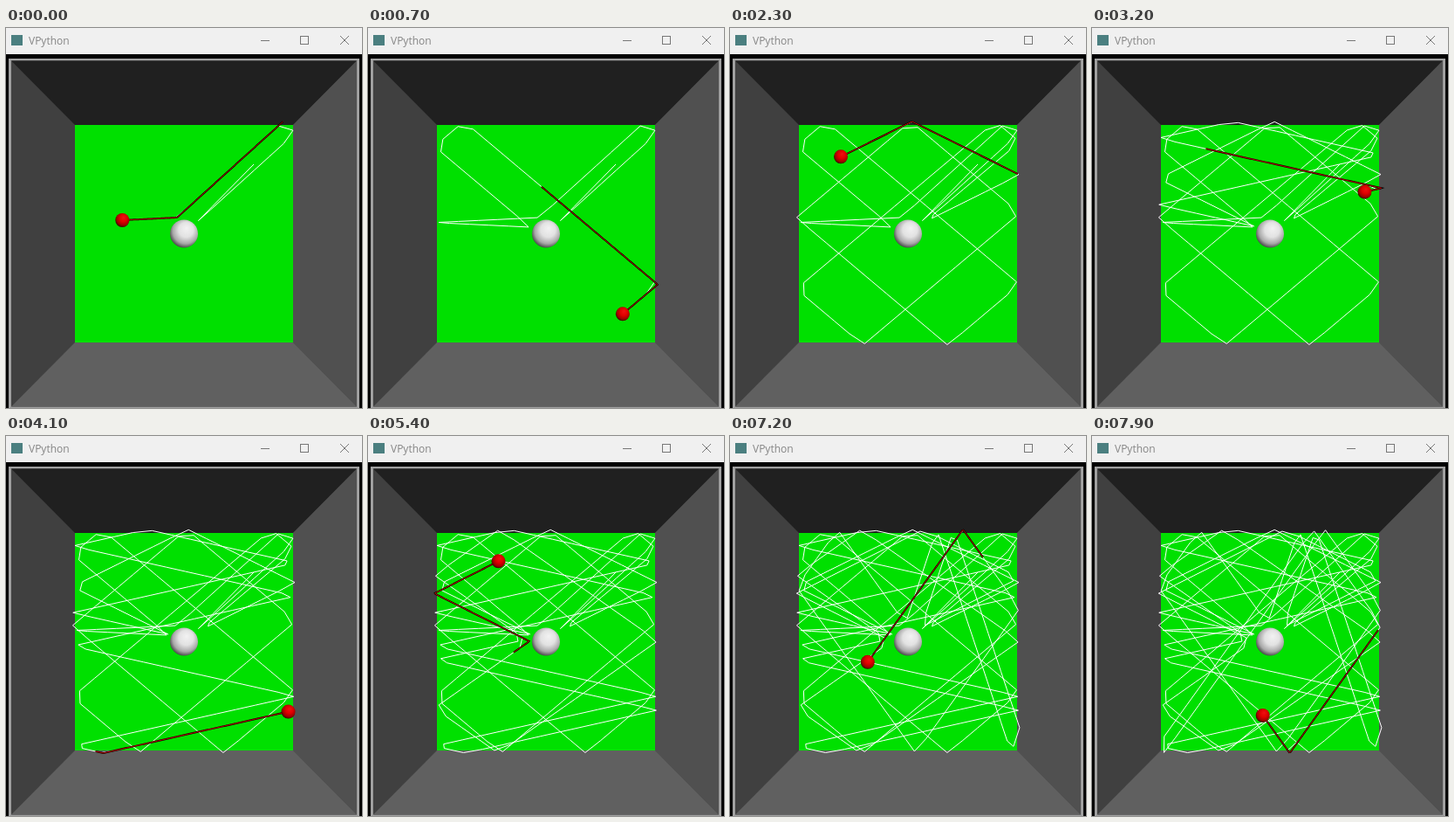
Animation of 408 by 435 pixels, one loop 8 s. Source, as an HTML page with a canvas:

```html
<!DOCTYPE html>
<html lang="en">
<head>
<meta charset="utf-8">
<title>VPython</title>
<style>
html, body { margin: 0; width: 100%; height: 100%; overflow: hidden; background: #000; }
canvas { position: absolute; left: 0; top: 0; }
span { position: absolute; left: 26px; top: 6px; font: 12px/18px "Open Sans", "Noto Sans", sans-serif; color: #858585; }
</style>
</head>
<body>
<canvas id="stage" width="408" height="435"></canvas>
<span>VPython</span>
<script>
const ctx = document.getElementById('stage').getContext('2d');
const LOOP = 8000, TICK = 100;
const SIZE = 256, LEFT = 76, TOP = 107;   // square in which the ball's centre moves
const STEP = 22.64;                       // distance between points of the white trail
const START = [284, 156];

// Straight runs between hits on the central sphere; wall bounces come from folding.
const RUNS = [[-65, 66], [249, -225], [-230, 11], [-1499, -1260], [475, -235],
  [-2263, -506], [-726, -510], [-478, -240], [244, -732], [-1030, -1432]];

// [time in ms, distance travelled]
const PACE = [[0, 491], [1400, 1887], [1800, 2262], [2300, 2967], [3600, 4555],
  [4100, 5087], [4500, 5539], [5400, 6557], [6500, 7798], [7900, 9422]];

function fold(v, low) {
  const m = (((v - low) % (2 * SIZE)) + 2 * SIZE) % (2 * SIZE);
  return low + Math.min(m, 2 * SIZE - m);
}

let from = START, total = 0;
const legs = RUNS.map(([dx, dy]) => {
  const leg = { x: from[0], y: from[1], dx, dy, begin: total, len: Math.hypot(dx, dy) };
  total += leg.len;
  from = [fold(leg.x + dx, LEFT), fold(leg.y + dy, TOP)];
  return leg;
});

function at(d) {
  const leg = legs.find(l => d < l.begin + l.len) || legs[legs.length - 1];
  const k = (d - leg.begin) / leg.len;
  return [fold(leg.x + leg.dx * k, LEFT), fold(leg.y + leg.dy * k, TOP)];
}

function distance(t) {
  const i = Math.max(1, PACE.findIndex(p => p[0] >= t));
  const [t0, d0] = PACE[i - 1], [t1, d1] = PACE[i];
  return d0 + (d1 - d0) * (t - t0) / (t1 - t0);
}

function poly(color, ...pts) {
  ctx.fillStyle = color;
  ctx.beginPath();
  pts.forEach(p => ctx.lineTo(...p));
  ctx.fill();
}

function line(color, width, pts) {
  ctx.strokeStyle = color;
  ctx.lineWidth = width;
  ctx.beginPath();
  pts.forEach(p => ctx.lineTo(...p));
  ctx.stroke();
}

function box(color, x, y, w, h) {
  ctx.fillStyle = color;
  ctx.fillRect(x, y, w, h);
}

function sphere(x, y, r, colors) {
  const g = ctx.createRadialGradient(x + r * 0.2, y - r * 0.4, 0, x + r * 0.1, y - r * 0.15, r * 1.18);
  [0, 0.45, 0.78, 1].forEach((stop, i) => g.addColorStop(stop, colors[i]));
  ctx.fillStyle = g;
  ctx.beginPath();
  ctx.arc(x, y, r, 0, 7);
  ctx.fill();
}

function titleBar() {
  box('#f0f0f0', 0, 0, 408, 30);
  box('#4b7f80', 6, 8, 13, 12);
  line('#777', 1, [[292, 14.5], [302, 14.5]]);
  ctx.strokeRect(337.5, 9.5, 9, 9);
  line('#777', 1, [[383, 9], [393, 19]]);
  line('#777', 1, [[393, 9], [383, 19]]);
}

function room() {
  box('#000', 0, 30, 408, 405);
  box('#a0a0a0', 3, 35, 402, 400);
  const a = [6, 37.5], b = [402, 37.5], c = [402, 433.5], d = [6, 433.5];
  const e = [79, 111], f = [329, 111], g = [329, 360], h = [79, 360];
  box('#404040', 6, 37.5, 396, 396);
  poly('#202020', a, b, f, e);
  poly('#505050', b, c, g, f);
  poly('#606060', c, d, h, g);
  box('#00e000', 79, 111, 250, 249);
}

function draw(t) {
  const d = distance(t), path = [], tail = [];
  for (let k = 0; k * STEP <= d; k++) path.push(at(k * STEP));
  for (let k = 100; k >= 0; k--) tail.push(at(d - k * STEP / 10));

  room();
  titleBar();
  line('#fff', 1, path);
  line('#000', 2, tail);
  line('#c00000', 1, tail);
  sphere(204, 235.5, 16, ['#f2f2f2', '#e2e2e2', '#a8a8a8', '#484848']);

  // The walls hide what pokes through them.
  ctx.save();
  ctx.beginPath();
  ctx.rect(74, 105, 260, 260);
  ctx.clip();
  sphere(...at(d), 8, ['#f01010', '#e00000', '#a00000', '#300000']);
  ctx.restore();
}

const begin = performance.now();
function frame() {
  const t = (performance.now() - begin) % LOOP;
  draw(Math.floor(t / TICK) * TICK);
  requestAnimationFrame(frame);
}
frame();
</script>
</body>
</html>
```
